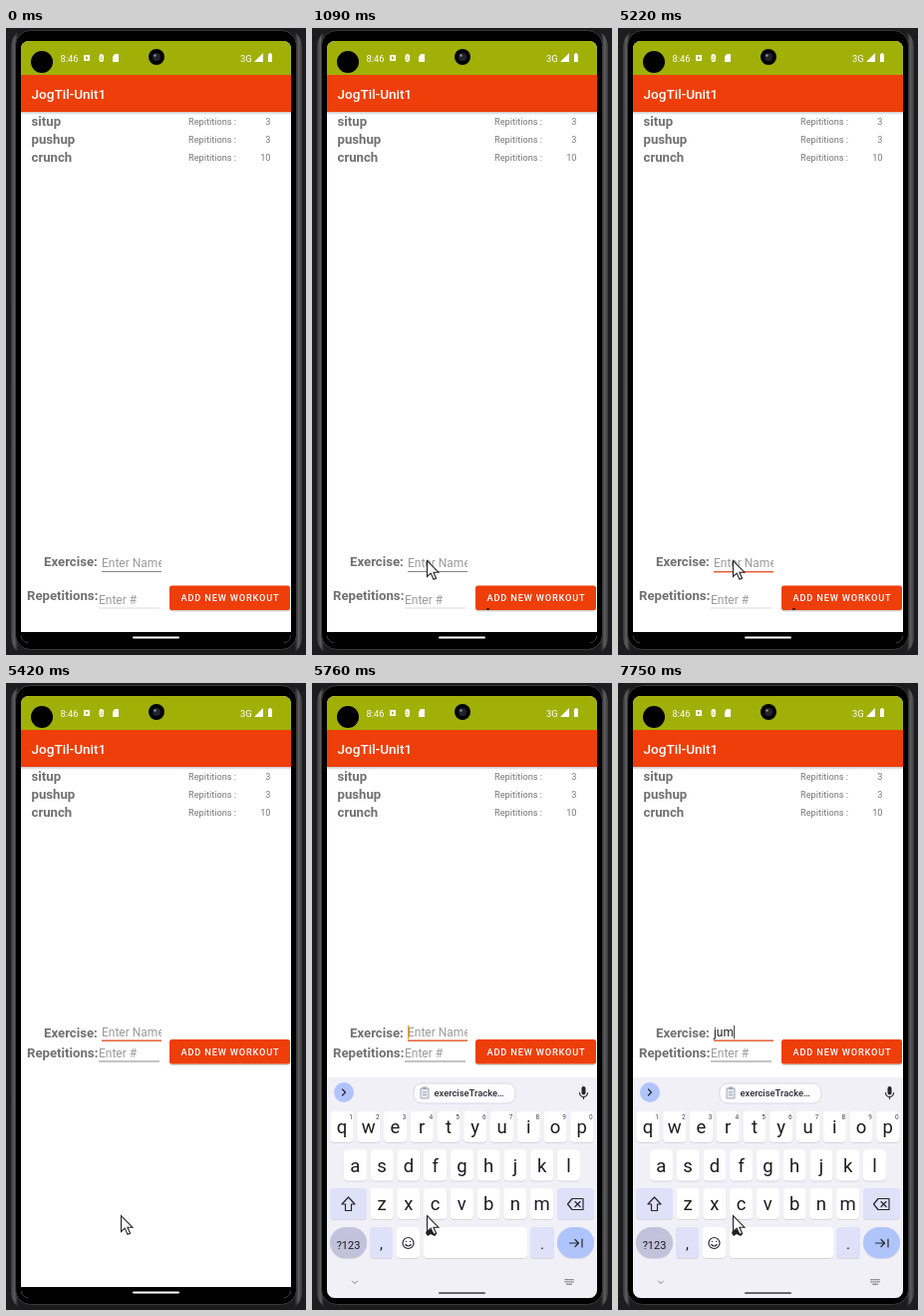
Write an HTML page that moves like this. It is 301x628 px and loops after 8 s.

```html
<!DOCTYPE html>
<html lang="en">
<head>
<meta charset="utf-8">
<title>Workout list</title>
<style>
  html, body { margin: 0; width: 100%; height: 100%; overflow: hidden; background: #1d1d1f; }
  svg { display: block; }
  text { font-family: Roboto, sans-serif; white-space: pre; }
  .label { font-size: 13.2px; font-weight: 700; fill: #707070; }
  .small { font-size: 9.2px; fill: #777; }
  .field { font-size: 12px; }
  .hint { fill: #9b9b9b; }
  .key { font-size: 18.5px; fill: #1b1b1f; text-anchor: middle; }
  .digit { font-size: 6.5px; fill: #44464f; text-anchor: middle; }
  .line { fill: none; stroke: #25262b; stroke-width: 1.2; stroke-linecap: round; stroke-linejoin: round; }
</style>
</head>
<body>
<svg width="301" height="628" viewBox="0 0 301 628">
  <defs>
    <clipPath id="screenClip"><rect x="15" y="13" width="271" height="603" rx="8"/></clipPath>
    <clipPath id="nameClip"><rect x="95" y="-14" width="61" height="24"/></clipPath>
    <linearGradient id="edge">
      <stop offset="0" stop-color="#3a3a3c"/><stop offset=".012" stop-color="#5c5c5e"/>
      <stop offset=".025" stop-color="#1c1c1d"/><stop offset=".975" stop-color="#1c1c1d"/>
      <stop offset=".988" stop-color="#5c5c5e"/><stop offset="1" stop-color="#3a3a3c"/>
    </linearGradient>
    <linearGradient id="shade" x2="0" y2="1">
      <stop stop-color="#000" stop-opacity=".22"/><stop offset="1" stop-color="#000" stop-opacity="0"/>
    </linearGradient>
  </defs>

  <rect x="5" y="0" width="292" height="629" rx="19" fill="url(#edge)"/>
  <rect x="9.5" y="2.5" width="282" height="620" rx="15" stroke="#39393b"/>

  <g clip-path="url(#screenClip)">
    <rect x="15" y="13" width="271" height="603" fill="#fff"/>
    <rect x="15" y="13" width="271" height="34" fill="#a1b007"/>
    <rect x="15" y="47" width="271" height="37" fill="#ee3e09"/>
    <rect x="15" y="84" width="271" height="3" fill="url(#shade)"/>
    <text x="25.5" y="71" font-size="13.6" font-weight="500" fill="#fff">JogTil-Unit1</text>

    <!-- status bar -->
    <circle cx="36" cy="34" r="11"/>
    <circle cx="151" cy="29" r="8"/>
    <circle cx="151" cy="29" r="4" fill="#20242c"/>
    <circle cx="149.5" cy="27.5" r="1.2" fill="#8992a0"/>
    <g fill="#fff">
      <text x="54.5" y="33.5" font-size="9.4">8:46</text>
      <text x="235" y="33.5" font-size="9.4">3G</text>
      <path d="M78 27h6v6h-6zM107 29l2-3h4v8h-6zM249 34l9-9v9zM263 26h1v-1h2v1h1v8h-4z"/>
      <rect x="93.5" y="26" width="4.5" height="8" rx="2.2"/>
    </g>
    <path d="M80 28.3v3.4l2.8-1.7zM94.5 28.7h2.5v.8h-2.5zM94.5 31h2.5v.8h-2.5z" fill="#a1b007"/>

    <g id="list"></g>

    <!-- entry form -->
    <text id="nameLabel" class="label" x="38">Exercise:</text>
    <text id="repsLabel" class="label" x="21">Repetitions:</text>
    <g id="nameField">
      <g clip-path="url(#nameClip)"><text id="nameText" class="field" x="96"></text></g>
      <rect id="nameRule" x="96" y="4" width="60"/>
      <rect id="caret" y="-10.5" width="1.2" height="13.5"/>
    </g>
    <g id="repsField">
      <text class="field hint" x="93">Enter #</text>
      <rect id="repsRule" x="93" y="4" width="61" height="1"/>
    </g>
    <g id="button">
      <rect x="164" y="1" width="121" height="25" rx="3" fill="#000" opacity=".18"/>
      <rect x="164" width="121" height="24.5" rx="2.5" fill="#ee3e09"/>
      <text x="175.5" y="15.7" font-size="9.2" font-weight="500" letter-spacing=".85" fill="#fff">ADD NEW WORKOUT</text>
      <rect id="speck" x="175" y="22.5" width="3" height="2" fill="#501a10"/>
    </g>

    <rect x="15" y="605" width="271" height="11"/>
    <rect x="127" y="609.5" width="47" height="2" rx="1" fill="#fff"/>

    <g id="keyboard">
      <rect x="15" y="395" width="271" height="221" fill="#f1f0f7"/>
      <g id="keys"></g>
      <circle cx="32" cy="410" r="10" fill="#b0c4fc"/>
      <path class="line" d="M30.5 407l3 3l-3 3M268.5 410.5a4 4 0 0 0 8 0M272.5 414.5v2"/>
      <rect x="270.5" y="404" width="4" height="8.5" rx="2" fill="#25262b"/>
      <path class="line" d="M36.5 515l6.5 7h-3.5v6.500h-6v-6.500h-3.500z
        M261 516.500h11v11h-11l-4.500-5.500zM264 519.500l5 5m0-5l-5 5
        M258.500 561h9m-3.500-3.500l3.500 3.500l-3.500 3.500M271 557v8"/>
      <circle class="line" cx="96.500" cy="561" r="5.500"/>
      <path class="line" d="M94.500 559.300v.2M98.500 559.300v.2M93.800 562.500q2.700 3 5.400 0"/>
      <rect id="homeBar" x="127" y="610" width="47" height="2" rx="1"/>
      <g id="navIcons" fill="#77777d">
        <path class="line" d="M40.500 599l2.500 2.500l2.500-2.500" style="stroke:#77777d;stroke-width:1"/>
        <path d="M253 597h10v1.300h-10zM253 599.300h10v1.300h-10zM255 601.600h6v1.300h-6z" stroke="#f1f0f7" stroke-width=".6" stroke-dasharray="1 1"/>
      </g>
      <g id="chip">
        <rect x="102" y="401" width="102" height="20" rx="8" fill="#fdfcff" stroke="#d9d9e2"/>
        <path d="M109 406h8v10h-8z" fill="#e6e8f2" stroke="#a3a6b4"/>
        <path d="M111 404.500h4v2.500h-4zM111 409.500h4v1h-4zM111 412h4v1h-4z" fill="#a3a6b4"/>
        <text x="122.500" y="414" font-size="9.400" font-weight="500" fill="#2b2b30">exerciseTracke…</text>
      </g>
    </g>
  </g>

  <circle id="tap" cx="115" cy="533" r="12" fill="#fffa40" opacity=".65"/>
  <path id="smudge" d="M114 551l2-5l3 2l2-3l2 5l2 2l-2 2l-4-2l-3 2z" fill="#222"/>
  <path id="pointer" d="M0 0v16l3.700-3.400l2.800 6.200l2.600-1.100l-2.700-6h5z" fill="#fff" stroke="#222" stroke-width="1.100"/>
</svg>

<script>
const LOOP = 8000;
const $ = id => document.getElementById(id);
const show = (id, on) => $(id).style.display = on ? "" : "none";
const set = (id, attrs) => {
  for (const name in attrs) $(id).setAttribute(name, attrs[name]);
};
const moveTo = (id, x, y) => set(id, { transform: `translate(${x} ${y})` });

$("list").innerHTML = [["situp", 3], ["pushup", 3], ["crunch", 10]].map(([name, reps], i) => {
  const y = 98 + 18 * i;
  return `<text class="label" x="25.500" y="${y}">${name}</text>
    <text class="small" x="183" y="${y - 1}">Repititions :</text>
    <text class="small" x="265.500" y="${y - 1}" text-anchor="end">${reps}</text>`;
}).join("");

const key = (x, y, width, fill, label = "", radius = 4, size = 18.5) =>
  `<rect x="${x}" y="${y + 1}" width="${width}" height="31" rx="${radius}" fill="#d6d5de"/>
   <rect x="${x}" y="${y}" width="${width}" height="31" rx="${radius}" fill="${fill}"/>
   <text class="key" x="${x + width / 2}" y="${y + 22}" style="font-size:${size}px">${label}</text>`;

const PITCH = 26.75;
const letterRow = (letters, x, y) =>
  [...letters].map((c, i) => key(x + PITCH * i, y, 23, "#fff", c)).join("");

$("keys").innerHTML =
  letterRow("qwertyuiop", 18.5, 429) +
  [..."1234567890"].map((d, i) => `<text class="digit" x="${39 + PITCH * i}" y="437">${d}</text>`).join("") +
  letterRow("asdfghjkl", 31.9, 467.5) +
  letterRow("zxcvbnm", 58.6, 506) +
  key(18, 506, 37, "#dfe1f9") + key(246, 506, 37, "#dfe1f9") +
  key(18, 545, 37, "#c2c2dc", "?123", 15.5, 11) +
  key(58, 545, 23, "#dfe1f9", ",", 4, 15) + key(85, 545, 23, "#fff") +
  key(112, 545, 104, "#fff") + key(219, 545, 24, "#dfe1f9", ".", 4, 15) +
  key(246, 545, 37, "#b0c4fc", "", 15.5);

function placeForm(raised) {
  set("nameLabel", { y: raised ? 355 : 539 });
  set("repsLabel", { y: raised ? 375 : 573 });
  moveTo("nameField", 0, raised ? 353.5 : 540);
  moveTo("repsField", 0, raised ? 374.5 : 576.5);
  moveTo("button", 0, raised ? 357 : 558.5);
  set("repsRule", { fill: raised ? "#8a8a8a" : "#dcdcdc" });
}

function placePointer(t) {
  const step = Math.min(11, Math.floor((t - 270) / 69));
  const left = (1 - step / 11) ** 2;
  show("pointer", t >= 270);
  moveTo("pointer", 115.5 + 122 * left, (t < 1090 ? 534.5 : 533.5) + 88 * left);
}

function draw(t) {
  const between = (from, to) => t >= from && t < to;
  const focused = t >= 4690;
  const raised = t >= 5420;
  const typed = t >= 7750 ? "jum" : t >= 7490 ? "ju" : t >= 7360 ? "j" : "";

  placePointer(t);
  placeForm(raised);

  const name = $("nameText");
  name.textContent = typed || "Enter Name";
  name.setAttribute("fill", typed ? "#222" : "#9b9b9b");
  set("nameRule", { fill: focused ? "#e5552b" : "#858585", height: focused ? 1.4 : 1 });
  set("caret", {
    x: 96 + (typed ? name.getComputedTextLength() : 0),
    fill: typed ? "#55504a" : "#e09a2c"
  });
  show("caret", typed || between(4760, 5220) || between(5690, 6170) || between(6700, 7160));

  show("tap", between(4490, 4690));
  show("speck", between(680, 5420));
  show("keyboard", t >= 5490);
  show("smudge", t >= 5490);
  show("navIcons", t >= 5560);
  set("homeBar", { fill: t >= 5560 ? "#66666b" : "#fff" });
  show("chip", t >= 5560);
  set("chip", { opacity: t < 5630 ? 0.5 : 1 });
}

const start = performance.now();
function tick() {
  draw((performance.now() - start) % LOOP);
  requestAnimationFrame(tick);
}
tick();
</script>
</body>
</html>
```
